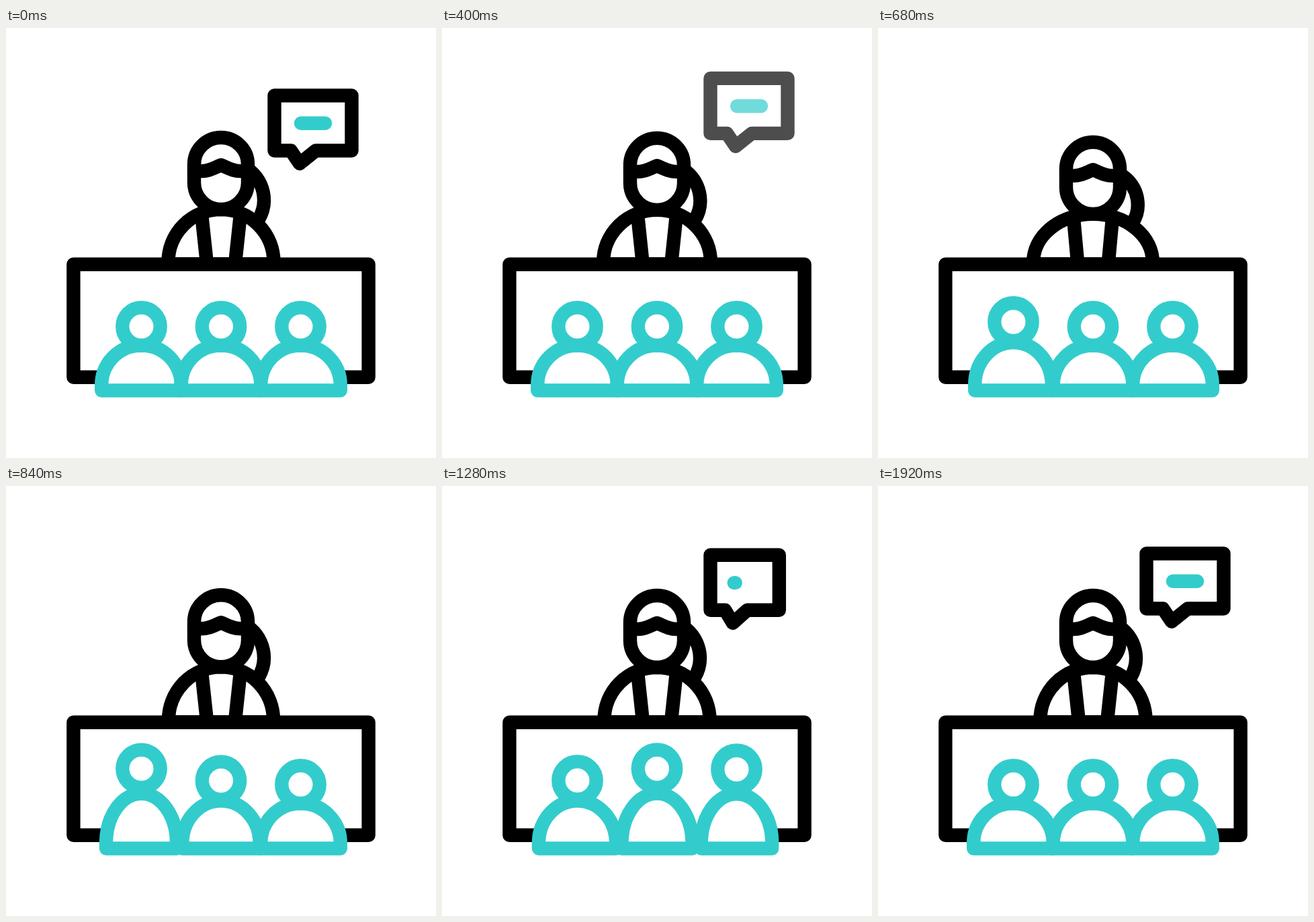
Recreate the animation shown at these times as an HTML page. Size 640 px wide and 640 px high, loop 2 s.

```html
<!DOCTYPE html>
<html lang="en">
<head>
<meta charset="utf-8">
<title>Presentation</title>
<style>
  html, body { margin: 0; width: 100%; height: 100%; overflow: hidden; background: #fff; }
  svg { display: block; width: 100vw; height: 100vh; }
  path, circle, rect { fill: none; stroke-width: 20.4; stroke-linejoin: round; stroke-linecap: round; }
  .dark { stroke: #000; }
  .teal { stroke: #3cc; }
  .solid { fill: #fff; }
</style>
</head>
<body>
<svg viewBox="0 0 640 640">
  <path id="tail" class="dark"/>
  <path id="torso" class="dark solid"/>
  <path id="collar" class="dark"/>
  <g id="head">
    <rect class="dark solid" x="280" y="163" width="80" height="107" rx="40"/>
    <path class="dark" d="M280 213H291C303 213 310 208 320 204C330 208 337 213 349 213H360"/>
  </g>
  <rect class="dark" x="100.4" y="351.7" width="439.2" height="168"/>
  <g id="audience"></g>
  <g id="bubble">
    <path id="frame" class="dark"/>
    <path id="dash" class="teal"/>
  </g>
</svg>
<script>
const LOOP = 2000;
const $ = id => document.getElementById(id);
const draw = (el, d) => el.setAttribute('d', d);
const progress = (t, from, to) => Math.min(1, Math.max(0, (t - from) / (to - from)));
const smooth = u => u * u * (3 - 2 * u);
const mix = (a, b, u) => a + (b - a) * u;

const [tail, torso, collar, head, bubble, frame, dash] =
  ['tail', 'torso', 'collar', 'head', 'bubble', 'frame', 'dash'].map($);

function addShape(name, parent) {
  const el = document.createElementNS('http://www.w3.org/2000/svg', name);
  el.setAttribute('class', 'teal solid');
  return parent.appendChild(el);
}

// Each listener rises and sinks around its own peak time.
const listeners = [[201.5, 976], [320, 1148], [438.5, 1428]].map(([x, peak]) => {
  const body = addShape('path', $('audience'));
  const face = addShape('circle', $('audience'));
  face.setAttribute('cx', x);
  face.setAttribute('r', 28.2);
  return { x, peak, body, face };
});

function steepInOut(u) {
  const half = v => 0.5 * (2 * v) ** 2.25;
  return u < 0.5 ? half(u) : 1 - half(1 - u);
}

function drawListener({ x, peak, body, face }, t) {
  const lift = steepInOut(Math.max(0, 1 - Math.abs(t - peak) / 465));
  const rx = 59.3 - 8 * lift;
  const ry = 59.3 + 17 * lift;
  draw(body, `M${x - rx} 539.5V531.5A${rx} ${ry} 0 0 1 ${x + rx} 531.5V539.5Z`);
  face.setAttribute('cy', 444.3 - 27.5 * lift);
}

// Positive values crouch, negative values stretch.
function speakerDrop(t) {
  if (t < 710) return 7 * smooth(progress(t, 310, 710));
  if (t < 990) return mix(7, -10, smooth(progress(t, 710, 990)));
  return mix(-10, 0, smooth(progress(t, 990, 1270)));
}

function drawSpeaker(t) {
  const drop = speakerDrop(t);
  const rx = 78.5 + drop * (drop > 0 ? 1.5 : 0.65);
  const ry = 78.5 - drop;
  const sway = Math.max(0, drop) * 0.4;
  const foot = 299 - 0.25 * drop;
  const top = 281 + drop;

  head.setAttribute('transform', `translate(0 ${drop})`);
  draw(torso, `M${320 - rx} 351.5V348.5A${rx} ${ry} 0 0 1 ${320 + rx} 348.5V351.5Z`);
  draw(collar, `M291.5 ${top}L${foot} 351M348.5 ${top}L${640 - foot} 351`);
  draw(tail, `M364 ${213 + drop}C${377 + sway} ${224 + drop} ${384 + sway} ${240 + drop} ` +
    `${384 + sway} ${257 + drop}Q${384 + sway} ${271 + drop} ${376 + sway} ${285 + drop * 0.7}`);
}

function drawBubble(t) {
  const entering = t >= 905;
  const leave = progress(t, 80, 680) ** 1.9;
  const open = entering ? smooth(progress(t, 905, 1379)) : 1;
  const shift = entering ? 21 * (1 - open) : -84 * leave;
  const px = x => 399.5 + (x - 399.5) * open;

  bubble.setAttribute('transform', `translate(0 ${shift})`);
  bubble.setAttribute('opacity', entering ? 1 : 1 - leave);
  draw(frame, `M399.5 100.5H${px(514.5)}V182.5H${px(461)}L${px(437)} 201.7L${px(424)} 182.5H399.5Z`);

  const length = entering ? smooth(progress(t, 1240, 1500)) : 1;
  dash.style.display = length > 0 ? '' : 'none';
  draw(dash, `M${px(439)} 141.8H${px(mix(439, 475, length))}`);
}

function render(t) {
  drawSpeaker(t);
  drawBubble(t);
  listeners.forEach(one => drawListener(one, t));
}

const start = performance.now();
function tick() {
  render((performance.now() - start) % LOOP);
  requestAnimationFrame(tick);
}
tick();
</script>
</body>
</html>
```
